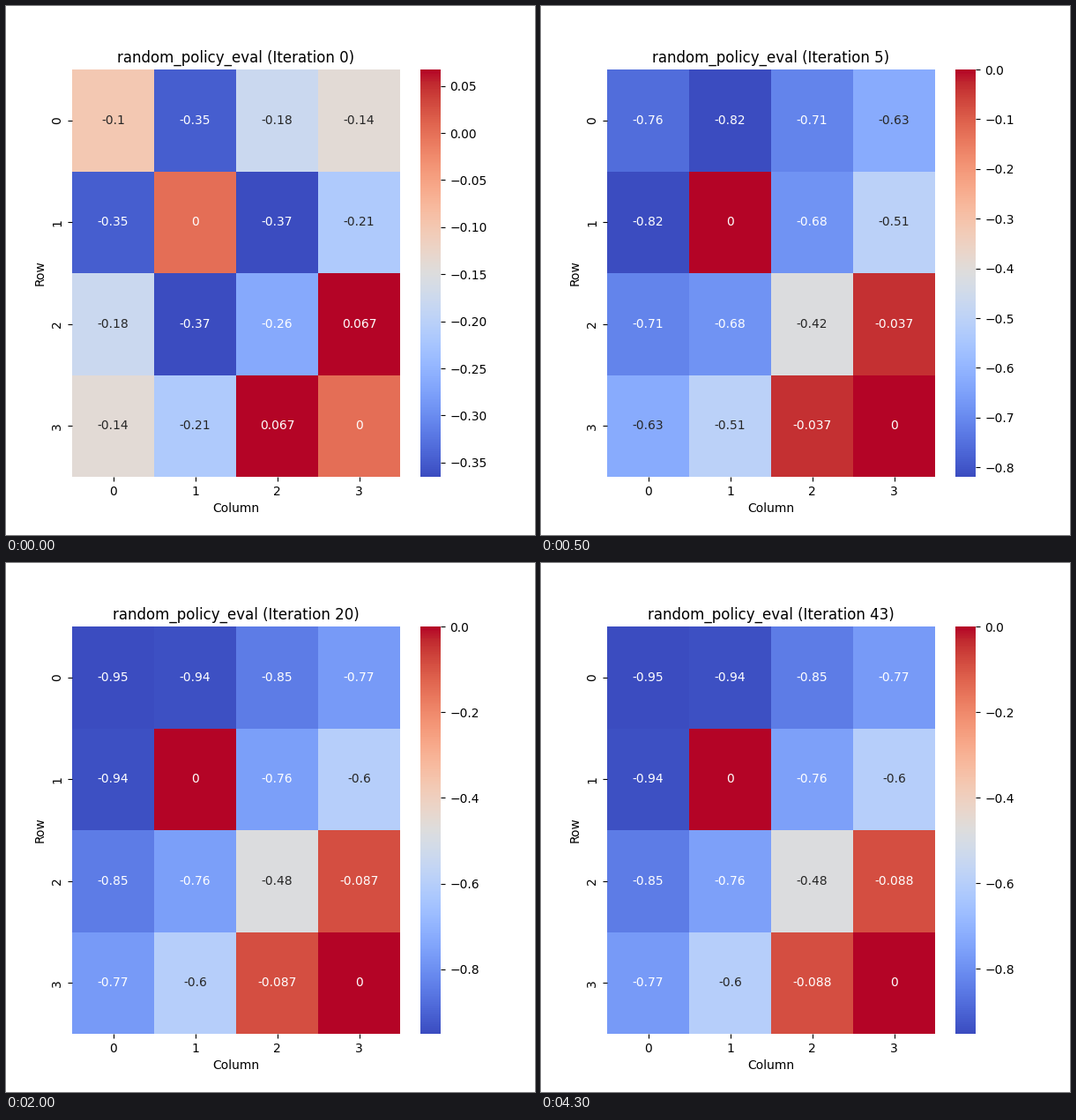
Write a matplotlib script that moves like this. It is 600 px wide and 600 px high and loops after 4.4 s.

```python
import numpy as np
import matplotlib.pyplot as plt
from matplotlib.animation import FuncAnimation

N = 4
SWEEPS = 44
GAMMA = 0.9
STEP = -0.1
ENDS = {(1, 1): -1.0, (3, 3): 1.0}
MOVES = [(-1, 0), (1, 0), (0, -1), (0, 1)]


def sweep(values):
    """One in-place pass of policy evaluation, all moves equally likely."""
    for r in range(N):
        for c in range(N):
            if (r, c) in ENDS:
                continue
            total = 0.0
            for dr, dc in MOVES:
                # Walls leave the agent where it is.
                nxt = (min(max(r + dr, 0), N - 1), min(max(c + dc, 0), N - 1))
                total += ENDS.get(nxt, STEP) + GAMMA * values[nxt]
            values[r, c] = total / len(MOVES)


def run():
    values = np.zeros((N, N))
    history = []
    for _ in range(SWEEPS):
        sweep(values)
        history.append(values.copy())
    return history


def ink(rgb):
    """Dark text on light cells, white text on dark cells."""
    rgb = np.asarray(rgb)
    linear = np.where(rgb <= 0.03928, rgb / 12.92, ((rgb + 0.055) / 1.055) ** 2.4)
    return ".15" if linear @ [0.2126, 0.7152, 0.0722] > 0.408 else "w"


history = run()

fig, ax = plt.subplots(figsize=(6, 6), dpi=100)
mesh = ax.pcolormesh(history[0], cmap="coolwarm", linewidth=0, edgecolor="white")
ax.set(xlim=(0, N), ylim=(N, 0), xlabel="Column", ylabel="Row")
for spine in ax.spines.values():
    spine.set_visible(False)
bar = fig.colorbar(mesh, ax=ax)
bar.outline.set_linewidth(0)

centers = np.arange(N) + 0.5
ax.set_xticks(centers, [str(i) for i in range(N)])
ax.set_yticks(centers, [str(i) for i in range(N)], rotation="vertical", va="center")
title = ax.set_title("")
labels = {
    (r, c): ax.text(c + 0.5, r + 0.5, "", ha="center", va="center")
    for r in range(N) for c in range(N)
}


def draw(i):
    values = history[i]
    mesh.set_array(values)
    mesh.set_clim(values.min(), values.max())
    for cell, label in labels.items():
        label.set_text(f"{values[cell]:.2g}")
        label.set_color(ink(mesh.to_rgba(values[cell])[:3]))
    title.set_text(f"random_policy_eval (Iteration {i})")
    return [mesh, title, *labels.values()]


anim = FuncAnimation(fig, draw, frames=SWEEPS, interval=100, repeat=True, repeat_delay=0)
plt.show()
```
